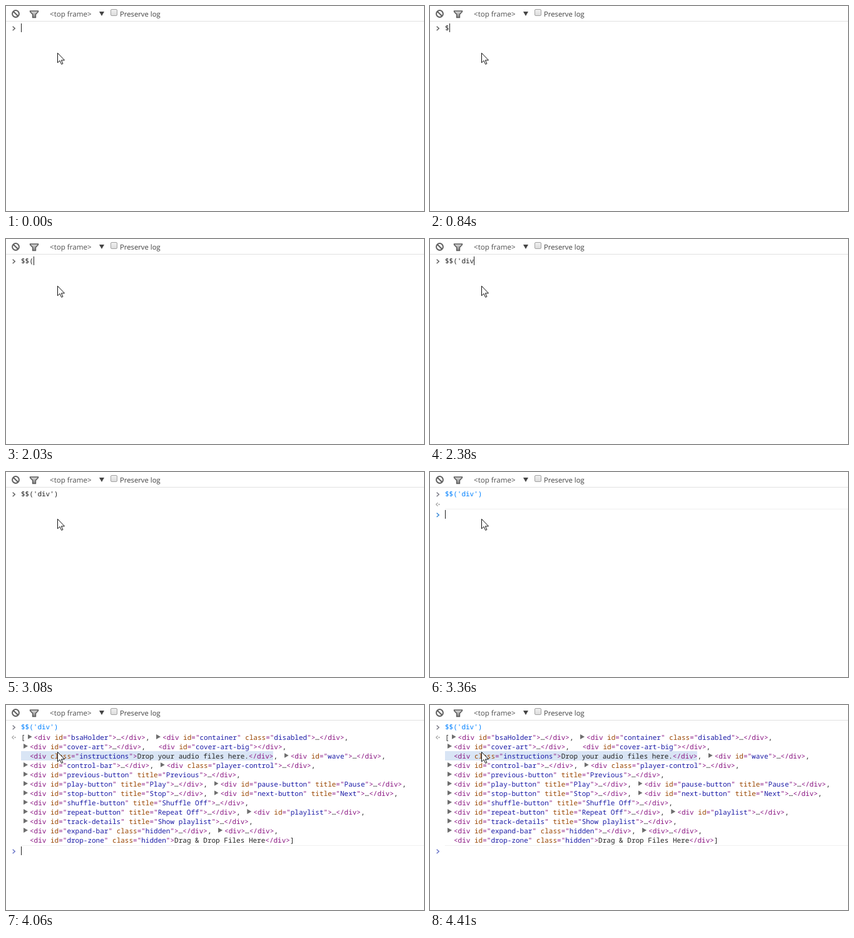
An HTML page with a canvas that plays this animation: 668x329 px, repeating every 4620 ms.

```html
<!DOCTYPE html>
<html lang="en">
<head>
<meta charset="utf-8">
<title>Console</title>
<style>
  html, body { margin: 0; width: 100%; height: 100%; overflow: hidden; background: #fff; }
  #stage { position: relative; width: 668px; height: 329px; overflow: hidden; }
  #stage > * { position: absolute; }
  canvas { left: 0; top: 0; }
  .bar { top: 6px; font: 11.3px/15px "Open Sans", "Noto Sans", sans-serif; color: #404040; white-space: pre; text-rendering: geometricPrecision; }
  #context { left: 70px; font-size: 11.6px; color: #505050; }
  #preserve { left: 182px; }
  .mono { left: 24px; font: 11px/17px "Noto Sans Mono", "DejaVu Sans Mono", monospace; color: #222; white-space: pre; text-rendering: geometricPrecision; }
  #command { top: 27px; }
  #result { top: 44px; }
  .row { height: 15px; }
  .node { display: inline-block; position: relative; height: 15px; padding-left: 14px; vertical-align: top; }
  .node.closed::before { content: ""; position: absolute; left: 4px; top: 3px; width: 7px; height: 8px; background: #6e6e6e; clip-path: polygon(0 0, 100% 50%, 0 100%); }
  .node.hover { background: #d9e5f5; }
  .tag { color: #881280; }
  .name { color: #994500; }
  .value { color: #1a1aa6; }
  #caret { width: 1px; height: 14px; background: #222; }
  #rule { left: 24px; right: 0; height: 1px; background: #f0f0f0; }
</style>
</head>
<body>
<div id="stage">
  <div class="bar" id="context">&lt;top frame&gt;</div>
  <div class="bar" id="preserve">Preserve log</div>
  <div id="rule"></div>
  <div id="command" class="mono"></div>
  <div id="result" class="mono"></div>
  <div id="caret"></div>
  <canvas id="art" width="668" height="329"></canvas>
</div>
<script>
const LOOP = 4620, LEFT = 24, ADVANCE = 6.6;
const COMMAND = "$$('div')";
const TYPED = [[840, 1], [980, 2], [1260, 3], [2170, 5], [2310, 6], [2380, 7], [2800, 9]];
const CARET_OFF = [[70, 490], [1610, 2030], [2590, 2800], [3080, 3220], [3710, 4060], [4410, LOOP]];
const ENTER = 3220, PENDING = 3360, DONE = 3570, HOVER = 4060;

// A leading "+" marks a collapsed node with a disclosure triangle.
const ROWS = [
  '+<div id="bsaHolder">…</div>, +<div id="container" class="disabled">…</div>,',
  '+<div id="cover-art">…</div>, <div id="cover-art-big"></div>,',
  '<div class="instructions">Drop your audio files here.</div>, +<div id="wave">…</div>,',
  '+<div id="control-bar">…</div>, +<div class="player-control">…</div>,',
  '+<div id="previous-button" title="Previous">…</div>,',
  '+<div id="play-button" title="Play">…</div>, +<div id="pause-button" title="Pause">…</div>,',
  '+<div id="stop-button" title="Stop">…</div>, +<div id="next-button" title="Next">…</div>,',
  '+<div id="shuffle-button" title="Shuffle Off">…</div>,',
  '+<div id="repeat-button" title="Repeat Off">…</div>, +<div id="playlist">…</div>,',
  '+<div id="track-details" title="Show playlist">…</div>,',
  '+<div id="expand-bar" class="hidden">…</div>, +<div>…</div>,',
  '<div id="drop-zone" class="hidden">Drag & Drop Files Here</div>]'
];

const $ = id => document.getElementById(id);
const ctx = $('art').getContext('2d');

function add(parent, kind, text = '', el = 'span') {
  const node = document.createElement(el);
  node.className = kind;
  node.textContent = text;
  parent.append(node);
  return node;
}

function addNode(row, markup) {
  const closed = markup[0] === '+';
  const node = add(row, closed ? 'node closed' : 'node');
  for (const m of markup.slice(+closed).matchAll(/ (\w+)="([^"]*)"|<\/?div>?|>|[^<>]+/g)) {
    if (m[1]) {
      node.append(' ');
      add(node, 'name', m[1]);
      add(node, 'tag', '="');
      add(node, 'value', m[2]);
      add(node, 'tag', '"');
    } else if (/[<>]/.test(m[0])) add(node, 'tag', m[0]);
    else node.append(m[0]);
  }
}

ROWS.forEach((line, i) => {
  const row = add($('result'), 'row', i ? '' : '[', 'div');
  line.slice(0, -1).split(', ').forEach((markup, k) => {
    if (k) row.append(', ');
    addNode(row, markup);
  });
  row.append(line.slice(-1));
});
const hovered = $('result').children[2].querySelector('.node');

function path(points, closed) {
  ctx.beginPath();
  points.forEach(([x, y]) => ctx.lineTo(x, y));
  if (closed) ctx.closePath();
}

function line(points, color, width) {
  path(points);
  ctx.strokeStyle = color;
  ctx.lineWidth = width;
  ctx.stroke();
}

function shape(points, fill, stroke, width = 1) {
  path(points, true);
  ctx.fillStyle = fill;
  ctx.fill();
  if (!stroke) return;
  ctx.strokeStyle = stroke;
  ctx.lineWidth = width;
  ctx.stroke();
}

function fade(y0, y1, from, to) {
  const g = ctx.createLinearGradient(0, y0, 0, y1);
  g.addColorStop(0, from);
  g.addColorStop(1, to);
  return g;
}

function chevron(y, color) {
  line([[10.7, y - 3.2], [14.2, y], [10.7, y + 3.2]], color, 1.5);
}

function toolbar() {
  ctx.fillStyle = '#e1e1e1';
  ctx.fillRect(0, 24, 668, 1);

  ctx.beginPath();
  ctx.arc(15.5, 12.5, 5.4, 0, Math.PI * 2);
  ctx.strokeStyle = '#606060';
  ctx.lineWidth = 2;
  ctx.stroke();
  line([[11.7, 8.7], [19.3, 16.3]], '#606060', 2);

  shape([[38.6, 8], [51.4, 8], [51.4, 9.2], [47.4, 13.4], [47.4, 18.4], [42.6, 18.4], [42.6, 13.4], [38.6, 9.2]],
    fade(8, 19, '#dcdcdc', '#808080'), '#5c5c5c', 1.5);
  shape([[149, 9], [157, 9], [153, 16]], '#444');

  ctx.beginPath();
  ctx.roundRect(167.5, 5.5, 10, 10, 1.5);
  ctx.fillStyle = fade(5, 16, '#f2f2f2', '#dadada');
  ctx.fill();
  ctx.strokeStyle = '#a2a2a2';
  ctx.lineWidth = 1;
  ctx.stroke();
}

function pointer() {
  ctx.save();
  ctx.translate(82.5, 75.5);
  shape([[0, 0], [0, 15.5], [3.5, 12.2], [6.2, 18], [8.4, 17], [5.9, 11.5], [11, 11.5]], '#fff', '#111');
  ctx.restore();
}

function draw(t) {
  const entered = t >= ENTER, pending = t >= PENDING, done = t >= DONE;
  const caretTop = done ? 227 : pending ? 61 : entered ? 45 : 28;
  const count = TYPED.reduce((n, [at, len]) => t >= at ? len : n, 0);

  $('command').textContent = COMMAND.slice(0, count);
  $('command').style.color = entered ? '#0080ff' : '#222';
  $('result').style.visibility = done ? 'visible' : 'hidden';
  hovered.classList.toggle('hover', t >= HOVER);

  $('rule').style.visibility = entered ? 'visible' : 'hidden';
  $('rule').style.top = caretTop - 2 + 'px';

  const off = CARET_OFF.some(([from, to]) => t >= from && t < to);
  const caret = $('caret').style;
  caret.visibility = off ? 'hidden' : 'visible';
  caret.left = Math.round(LEFT + (entered ? 0 : count * ADVANCE)) + 'px';
  caret.top = caretTop + 'px';

  ctx.clearRect(0, 0, 668, 329);
  toolbar();
  chevron(36, entered ? '#7a7a85' : '#606060');
  if (entered) chevron(caretTop + 8, done ? '#6b76c9' : '#3c8bd8');
  if (pending) {
    line([[12.5, 49.2], [9.8, 52], [12.5, 54.8]], '#a8a8a8', 1.3);
    ctx.fillStyle = '#a8a8a8';
    ctx.fillRect(13.5, 51, 2, 2);
  }
  pointer();
}

function tick() {
  draw(performance.now() % LOOP);
  requestAnimationFrame(tick);
}
tick();
</script>
</body>
</html>
```
